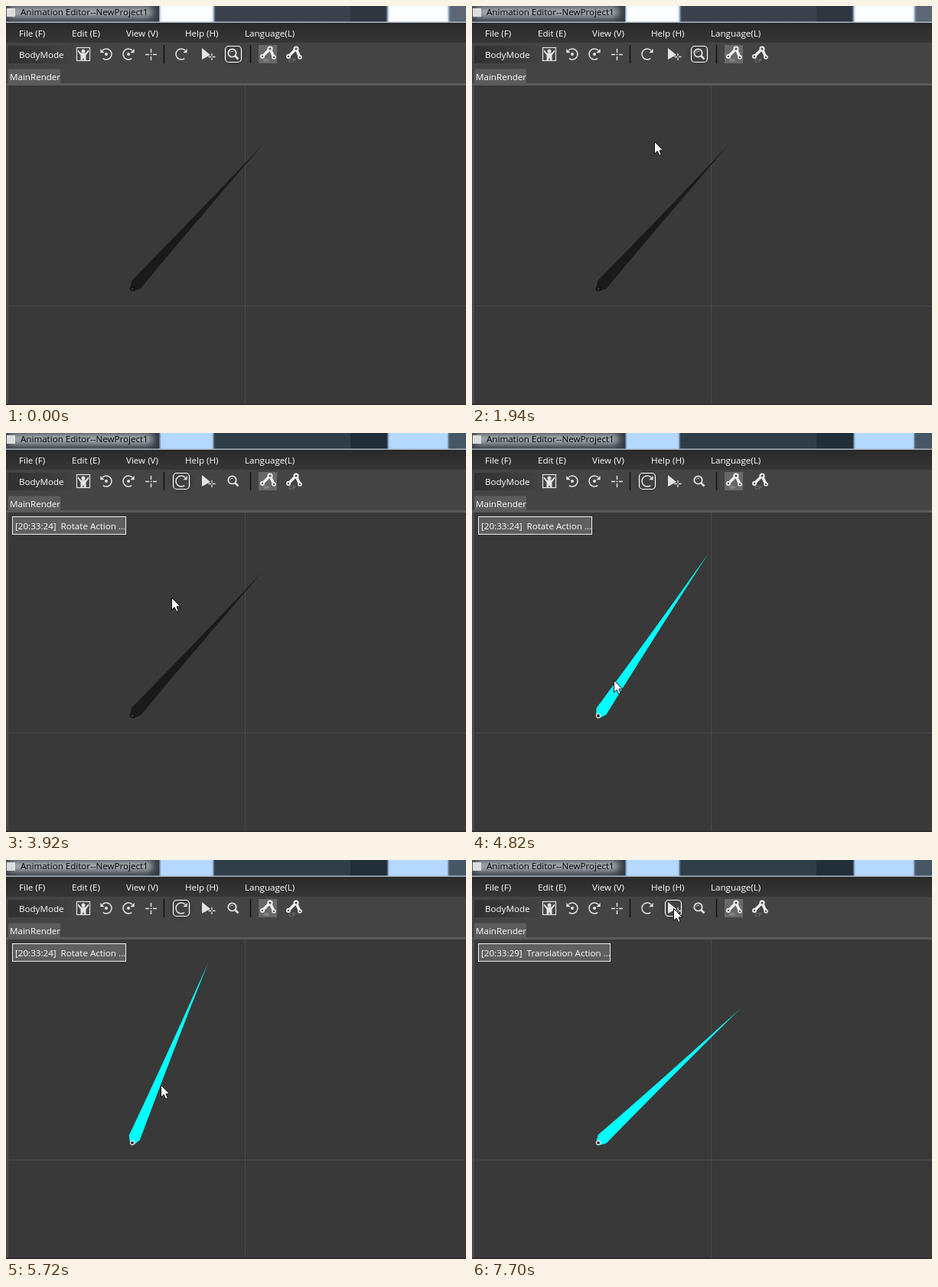
An HTML page for the animation above (8 s loop, 601x522 px).

```html
<!DOCTYPE html>
<html lang="en">
<head>
<meta charset="utf-8">
<title>Animation Editor</title>
<style>
html, body { margin: 0; width: 100%; height: 100%; overflow: hidden; background: #444; }
svg { display: block; width: 601px; height: 522px; }
text { font: 11.6px "Open Sans", "Noto Sans", sans-serif; fill: #fff; white-space: pre; }
.caption { fill: #000; }
.hint { font-family: "Noto Sans CJK SC", "Noto Sans CJK", sans-serif; font-size: 12px; fill: #333; }
.line { fill: none; stroke: #e4e4e4; stroke-width: 1.5; }
.solid { fill: #e4e4e4; }
</style>
</head>
<body>
<svg viewBox="0 0 601 522">
  <defs>
    <filter id="soft" x="-20%" y="-60%" width="140%" height="220%"><feGaussianBlur stdDeviation="5"/></filter>
    <filter id="edge" x="-10%" y="-10%" width="120%" height="120%"><feGaussianBlur stdDeviation="1.2 0"/></filter>
    <linearGradient id="menu" x2="0" y2="1">
      <stop stop-color="#292929"/><stop offset="1" stop-color="#363636"/>
    </linearGradient>
    <linearGradient id="mode">
      <stop stop-color="#303030"/><stop offset="1" stop-color="#424242"/>
    </linearGradient>
    <radialGradient id="shade">
      <stop offset=".5" stop-color="#333" stop-opacity=".7"/><stop offset="1" stop-color="#333" stop-opacity="0"/>
    </radialGradient>
    <clipPath id="bar"><rect width="601" height="22"/></clipPath>
    <path id="panes" d="M201 -9h70v40h-70zM499 -9h79v40h-79z"/>
    <g id="turn">
      <path class="line" d="M4.2 5.6A7 7 0 1 1 5 -4.9"/>
      <path class="solid" d="M7.600 -7V-1.800H2.400Z"/>
    </g>
    <g id="arm">
      <path d="M-7 4L3 -6L8 5" fill="none" stroke="#eee" stroke-width="3.600" stroke-linejoin="round"/>
      <g fill="#eee"><circle cx="-7" cy="4" r="3"/><circle cx="3" cy="-6" r="3.600"/><circle cx="8" cy="5" r="2.800"/></g>
      <g fill="#555"><circle cx="-7" cy="4" r="1.200"/><circle cx="3" cy="-6" r="1.600"/><circle cx="8" cy="5" r="1.200"/></g>
    </g>
  </defs>

  <!-- window caption -->
  <g clip-path="url(#bar)">
    <g id="idle">
      <rect width="601" height="22" fill="#3c424d"/>
      <rect x="450" width="50" height="22" fill="#30353f"/>
      <rect x="579" width="22" height="22" fill="#5c6675"/>
      <use href="#panes" fill="#fbfdff" stroke="#a9cdf5" stroke-width="2" filter="url(#edge)"/>
    </g>
    <g id="active">
      <rect width="601" height="22" fill="#2f3d49"/>
      <rect x="450" width="50" height="22" fill="#212d37"/>
      <rect x="579" width="22" height="22" fill="#475664"/>
      <use href="#panes" fill="#b4d8ff" filter="url(#edge)"/>
    </g>
    <rect width="200" height="22" fill="#343a41"/>
    <rect x="2" y="1" width="190" height="14" rx="6" fill="#aab0b6" filter="url(#soft)"/>
    <rect y="20.500" width="601" height="1.500" fill="#a9b6c2"/>
  </g>
  <rect x="1" y="3" width="11" height="11" fill="#ddd"/>
  <text class="caption" x="19" y="12">Animation Editor--NewProject1</text>

  <!-- menu -->
  <rect y="22" width="601" height="26" fill="url(#menu)"/>
  <text x="17" y="40">File (F)</text>
  <text x="86" y="40">Edit (E)</text>
  <text x="157" y="40">View (V)</text>
  <text x="234" y="40">Help (H)</text>
  <text x="312" y="40">Language(L)</text>

  <!-- toolbar -->
  <rect y="48" width="601" height="56" fill="#444"/>
  <rect x="3" y="52" width="83" height="23" fill="url(#mode)"/>
  <text x="17" y="68">BodyMode</text>
  <g transform="translate(101 63)">
    <rect class="line" x="-8.500" y="-8.500" width="17" height="17" style="stroke-width:1.200"/>
    <circle class="solid" cy="-4" r="2.500"/>
    <path class="solid" d="M-7 -6L-3 -1.500H3L7 -6V-3L3.500 1.500V8H1L0 4.500L-1 8H-3.500V1.500L-7 -3Z"/>
  </g>
  <g transform="translate(131 63)"><use href="#turn" transform="scale(-1 1)"/><circle class="solid" r="2"/></g>
  <g transform="translate(160 63)"><use href="#turn"/><circle class="solid" r="2"/></g>
  <path class="line" d="M189.500 56V61M189.500 66V71M182 63.500H187M192 63.500H197M188.500 63.500h2"/>
  <path d="M206.500 51V75M319.500 51V75" stroke="#111" stroke-width="1.500"/>
  <g id="pick">
    <circle r="18" fill="url(#shade)"/>
    <rect x="-10.500" y="-10.500" width="21" height="21" rx="4.500" fill="#414141" stroke="#fff" stroke-width="1.200"/>
  </g>
  <use href="#turn" x="229" y="63"/>
  <g transform="translate(263 63)">
    <path class="solid" d="M-7 -8L4 1L-7 7Z"/>
    <path class="line" d="M6 -1V8M1.500 3.500H10.500" style="stroke-width:1.300;stroke-dasharray:3.500 2"/>
  </g>
  <g class="line">
    <circle cx="295.500" cy="61.500" r="5.200" stroke-width="1.800"/>
    <path d="M299.500 65.500L303.500 69.500" stroke-width="2.600"/>
    <path d="M292.800 61A3 3 0 0 1 297 59.500" stroke-width=".8"/>
  </g>
  <rect x="330" y="51" width="24" height="24" fill="#686868"/>
  <use href="#arm" x="342" y="62"/>
  <ellipse cx="340" cy="71" rx="4" ry="2" fill="#828282"/>
  <text x="369" y="74" style="font-size:8px;fill:#888">CP</text>
  <use href="#arm" x="376" y="62"/>

  <!-- viewport -->
  <path d="M3 102V84.500Q3 82.500 5 82.500H69Q71 82.500 71 84.500V102Z" fill="#5c5c5c"/>
  <text x="5" y="97">MainRender</text>
  <rect y="101" width="601" height="3" fill="#5a5a5a"/>
  <rect y="104" width="601" height="418" fill="#4a4a4a"/>
  <rect x="3" y="104" width="598" height="417" fill="#393939"/>
  <path d="M312.500 104V521M3 392.500H601" stroke="#484850"/>
  <rect y="520" width="601" height="2" fill="#322e30"/>

  <g id="bone">
    <path d="M256 0Q120 2.900 7 7.700L-1.500 3V-2.500L7 -7.700Q120 -2.900 256 0Z"/>
    <circle r="2.600" fill="#333" stroke-width="1.200"/>
  </g>

  <g id="log">
    <rect x="8.500" y="109.500" height="23" fill="#5f5f5f" stroke="#eee"/>
    <text x="12" y="126"></text>
  </g>
  <g id="tip">
    <rect x="230.500" y="82.500" width="35" height="21" rx="2" fill="#dcdcdc" stroke="#888"/>
    <text class="hint" x="236" y="97">旋转</text>
  </g>
  <path id="cursor" d="M.5 .5V16.300L4.200 12.900L6.700 18.500L9.300 17.400L6.900 11.900H11.700Z" fill="#fff" stroke="#111"/>
</svg>
<script>
const LOOP = 8000, START = 500, STEP = 60;
const $ = id => document.getElementById(id);

// [ms, x, y]
const pointer = [
  [440, 622, 441], [500, 588, 438], [740, 400, 402], [980, 262, 358], [1220, 202, 333],
  [1700, 202, 333], [1940, 238, 177], [2120, 240, 112], [2540, 231, 63], [2600, 231, 62],
  [3620, 231, 62], [3920, 216, 215], [4280, 192, 334],
  [4640, 192, 334], [4820, 185, 323], [5000, 157, 298], [5180, 116, 300],
  [5360, 116, 300], [5420, 127, 291], [5600, 170, 281], [5840, 220, 307],
  [6560, 220, 307], [6620, 224, 296], [6920, 246, 170], [7400, 263, 65], [7460, 263, 63]
];
// [ms, degrees]
const swing = [[4640, 47.9], [4820, 55.9], [5000, 84], [5240, 119.8], [5420, 119.8], [5640, 82], [5900, 43.4]];

// Monotone cubic through the keys
function track(keys, t, c) {
  const last = keys.length - 1;
  if (t <= keys[0][0]) return keys[0][c];
  if (t >= keys[last][0]) return keys[last][c];
  const i = keys.findIndex(k => k[0] > t) - 1;
  const slope = j => j < 0 || j >= last ? 0 : (keys[j + 1][c] - keys[j][c]) / (keys[j + 1][0] - keys[j][0]);
  const tangent = j => {
    const a = slope(j - 1), b = slope(j);
    return a * b > 0 ? 2 * a * b / (a + b) : 0;
  };
  const h = keys[i + 1][0] - keys[i][0], u = (t - keys[i][0]) / h, v = 1 - u;
  return v * v * (1 + 2 * u) * keys[i][c] + u * u * (3 - 2 * u) * keys[i + 1][c]
    + h * u * v * (v * tangent(i) - u * tangent(i + 1));
}

const show = (id, on) => $(id).setAttribute("opacity", +on);
const place = (id, x, y, more = "") => $(id).setAttribute("transform", `translate(${x} ${y})${more}`);
const clamp = v => Math.max(0, Math.min(1, v));

function draw(now) {
  const ms = now % LOOP;
  const t = ms < START ? 0 : START + Math.floor((ms - START) / STEP) * STEP;

  show("cursor", t >= START);
  place("cursor", Math.round(track(pointer, t, 1)), Math.round(track(pointer, t, 2)));

  place("bone", 165, 370, ` rotate(${-track(swing, t, 1)})`);
  const [body, joint] = $("bone").children;
  body.setAttribute("fill", t < 4520 ? "#1a1a1a" : "#0ff");
  joint.setAttribute("stroke", t < 4520 ? "#0c0c0c" : "#eee");

  show("active", t >= 2840);
  show("tip", t < 2840 ? clamp((t - 2540) / 240) : clamp((3020 - t) / 170));
  place("pick", t < 3020 ? 297 : t < 7700 ? 229 : 263, 63);

  const moved = t >= 7700;
  const [box, label] = $("log").children;
  show("log", t >= 3080);
  box.setAttribute("width", moved ? 172 : 148);
  label.textContent = moved ? "[20:33:29]  Translation Action ..." : "[20:33:24]  Rotate Action ...";
}

function tick() {
  draw(performance.now());
  requestAnimationFrame(tick);
}
tick();
</script>
</body>
</html>
```
